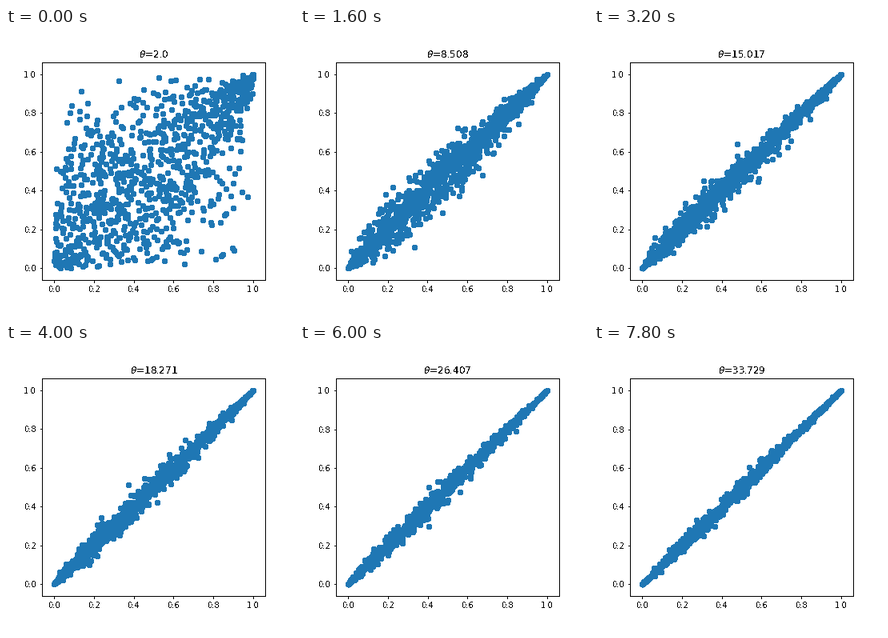
A matplotlib script that plays this animation: 360x360 px, repeating every 8000 ms.

```python
import numpy as np
import matplotlib.pyplot as plt
from matplotlib.animation import FuncAnimation

STAGE, DPI = 360, 72
POINTS = 1000
FRAMES, INTERVAL = 40, 200
THETAS = np.linspace(2, 50, 60)[:FRAMES]
LEFT, RIGHT, BOTTOM, TOP = 0.125, 0.9, 0.125, 0.88


def gumbel_copula(theta, rng):
    """Sample the Gumbel copula through a positive stable mixing variable."""
    a = 1 / theta
    w = rng.uniform(0, np.pi, POINTS)
    e = rng.exponential(size=POINTS)
    log_s = (a * np.log(np.sin(a * w)) - np.log(np.sin(w))
             + (1 - a) * (np.log(np.sin((1 - a) * w)) - np.log(e)))
    x = rng.exponential(size=(POINTS, 2))
    return np.exp(-np.exp(a * np.log(x) - log_s[:, None]))


def limits(values, pixels):
    """Data range grown by the marker radius, then by a 5% margin."""
    radius = 3 / pixels
    lo, hi = values.min() - radius, values.max() + radius
    margin = 0.05 * (hi - lo)
    return lo - margin, hi + margin


def crisp(image, dpi):
    """Round coverage to fully on or off, for hard pixel edges."""
    hard = np.rint(image * 255).astype(np.uint8)
    hard[..., 3] = np.where(image[..., 3] >= 0.5, 255, 0)
    return hard, 0, 0


plt.rcParams.update({"font.family": "DejaVu Sans", "font.size": 10})
fig, ax = plt.subplots(figsize=(STAGE / DPI, STAGE / DPI), dpi=DPI)
fig.subplots_adjust(left=LEFT, right=RIGHT, bottom=BOTTOM, top=TOP)
dots = ax.scatter([], [], s=36, color="#1f77b4", linewidths=1.5)
ticks = np.linspace(0, 1, 6)
ax.set_xticks(ticks)
ax.set_yticks(ticks)
title = ax.set_title("", fontsize=12)
for artist in (dots, title, ax.xaxis, ax.yaxis, *ax.spines.values()):
    artist.set_agg_filter(crisp)


def draw(i):
    pts = gumbel_copula(THETAS[i], np.random.default_rng(i))
    dots.set_offsets(pts)
    ax.set_xlim(limits(pts[:, 0], (RIGHT - LEFT) * STAGE))
    ax.set_ylim(limits(pts[:, 1], (TOP - BOTTOM) * STAGE))
    title.set_text(rf"$\theta$={round(float(THETAS[i]), 3)}")
    return dots, title


anim = FuncAnimation(fig, draw, frames=FRAMES, interval=INTERVAL,
                     init_func=lambda: draw(0), repeat=True, repeat_delay=0)
plt.show()
```
